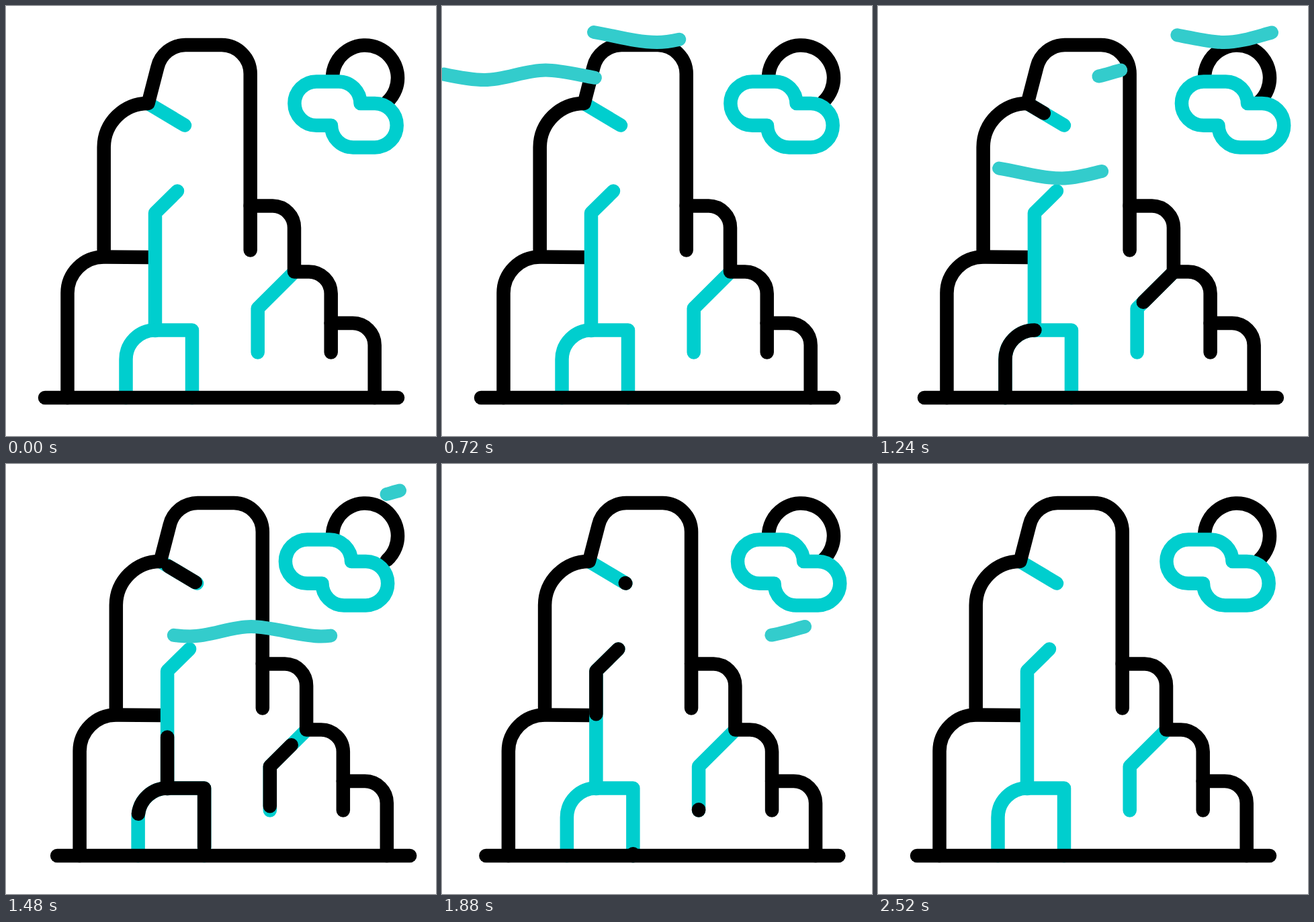
These frames come from a looping animation (640 px wide and 640 px high, 3200 ms). An HTML page:

```html
<!DOCTYPE html>
<html lang="en">
<head>
<meta charset="utf-8">
<title>Windy cliff</title>
<style>
  html, body { margin: 0; width: 100%; height: 100%; overflow: hidden; background: #fff; }
  svg { display: block; width: 100vw; height: 100vh; }
  path { fill: none; stroke: #000; stroke-width: 20.5; stroke-linecap: round; stroke-linejoin: round; }
  .teal { stroke: #00cece; }
  .wind { stroke: #33cccc; stroke-width: 20; }
</style>
</head>
<body>
<svg viewBox="0 0 640 640">
  <path d="M486 107A48.5 48.5 0 1 1 567 143"/>
  <g id="cloud">
    <path class="teal" d="M462 112.5H495A32.5 32.5 0 0 1 527.5 145H549A32.7 32.7 0 0 1 549 210.4H517A32.7 32.7 0 0 1 484 177.7H462A32.6 32.6 0 0 1 462 112.5Z"/>
  </g>
  <g id="cliff">
    <g id="backCracks"></g>
    <path d="M91.5 583V428A54 54 0 0 1 145.5 373.5L212 374"/>
    <path d="M145.7 373V210A65.5 65.5 0 0 1 211.5 145L225.5 91A43 43 0 0 1 267 58H321A43 43 0 0 1 363.7 101V363.5"/>
    <path d="M363.7 297.5H397A32.5 32.5 0 0 1 429 330V395.5H451A32.7 32.7 0 0 1 483.7 428V515.5"/>
    <path d="M483.7 472H516A32.7 32.7 0 0 1 548.7 505V583"/>
    <g id="frontCracks"></g>
    <path d="M58 583H583"/>
    <g id="shades"></g>
  </g>
  <g id="winds"></g>
</svg>
<script>
const LOOP = 3200, STEP = 40;
const $ = id => document.getElementById(id);

const cracks = [
  { d: 'M211.5 145L266 177.5', layer: 'backCracks', delay: 0 },
  { d: 'M429 396L374.7 450V515.5', layer: 'backCracks', delay: 0 },
  { d: 'M222 483V308L255 275.5', layer: 'frontCracks', delay: 280 },
  { d: 'M178.5 583V526A43.5 43.5 0 0 1 222 482.5H277V583', layer: 'frontCracks', delay: 0 }
];

const gust = 'M226 39C257 44 288 54 320 54C352 54 379 39.5 411 39.5S484 54 515 54C540 54 565 45 586 39.5';
const winds = [
  { delay: -200, y: 56, x: t => -237 + (t - 1040) * 0.0615 },
  { delay: 0, y: 0, x: () => 0 },
  { delay: 480, y: 202.5, x: () => -46 }
];

// [time, offset] stops, eased between neighbours
const cliffStops = [[880, 0], [1520, 18.3], [2160, 0]];
const cloudStops = [[880, 0], [1200, 24], [1520, -15], [1840, 11], [2160, 0]];

function addPath(parent, d, cls) {
  const p = document.createElementNS('http://www.w3.org/2000/svg', 'path');
  p.setAttribute('d', d);
  p.setAttribute('pathLength', 1);
  if (cls) p.setAttribute('class', cls);
  parent.appendChild(p);
  return p;
}

function ease(t, from, length) {
  const u = Math.min(1, Math.max(0, (t - from) / length));
  return (1 - Math.cos(Math.PI * u)) / 2;
}

function along(stops, t) {
  let v = stops[0][1];
  for (let i = 1; i < stops.length; i++) {
    const [t0, v0] = stops[i - 1], [t1, v1] = stops[i];
    v += (v1 - v0) * ease(t, t0, t1 - t0);
  }
  return v;
}

function trim(path, start, end) {
  const shown = end > start && end > 0 && start < 1;
  path.style.display = shown ? '' : 'none';
  path.setAttribute('stroke-dasharray', `${Math.max(0, end - start)} 2`);
  path.setAttribute('stroke-dashoffset', -start);
}

function move(el, x, y = 0) {
  el.setAttribute('transform', `translate(${x} ${y})`);
}

for (const c of cracks) {
  addPath($(c.layer), c.d, 'teal');
  c.shade = addPath($('shades'), c.d);
}
for (const w of winds) w.path = addPath($('winds'), gust, 'wind');

function draw(t) {
  move($('cliff'), along(cliffStops, t));
  move($('cloud'), along(cloudStops, t));
  for (const c of cracks) {
    trim(c.shade, ease(t, 1280 + c.delay, 640), ease(t, 960 + c.delay, 600));
  }
  for (const w of winds) {
    move(w.path, w.x(t), w.y);
    trim(w.path, ease(t, 750 + w.delay, 860), ease(t, 380 + w.delay, 840));
  }
}

const began = performance.now();
function tick() {
  const t = (performance.now() - began) % LOOP;
  draw(Math.floor(t / STEP) * STEP);
  requestAnimationFrame(tick);
}
tick();
</script>
</body>
</html>
```
